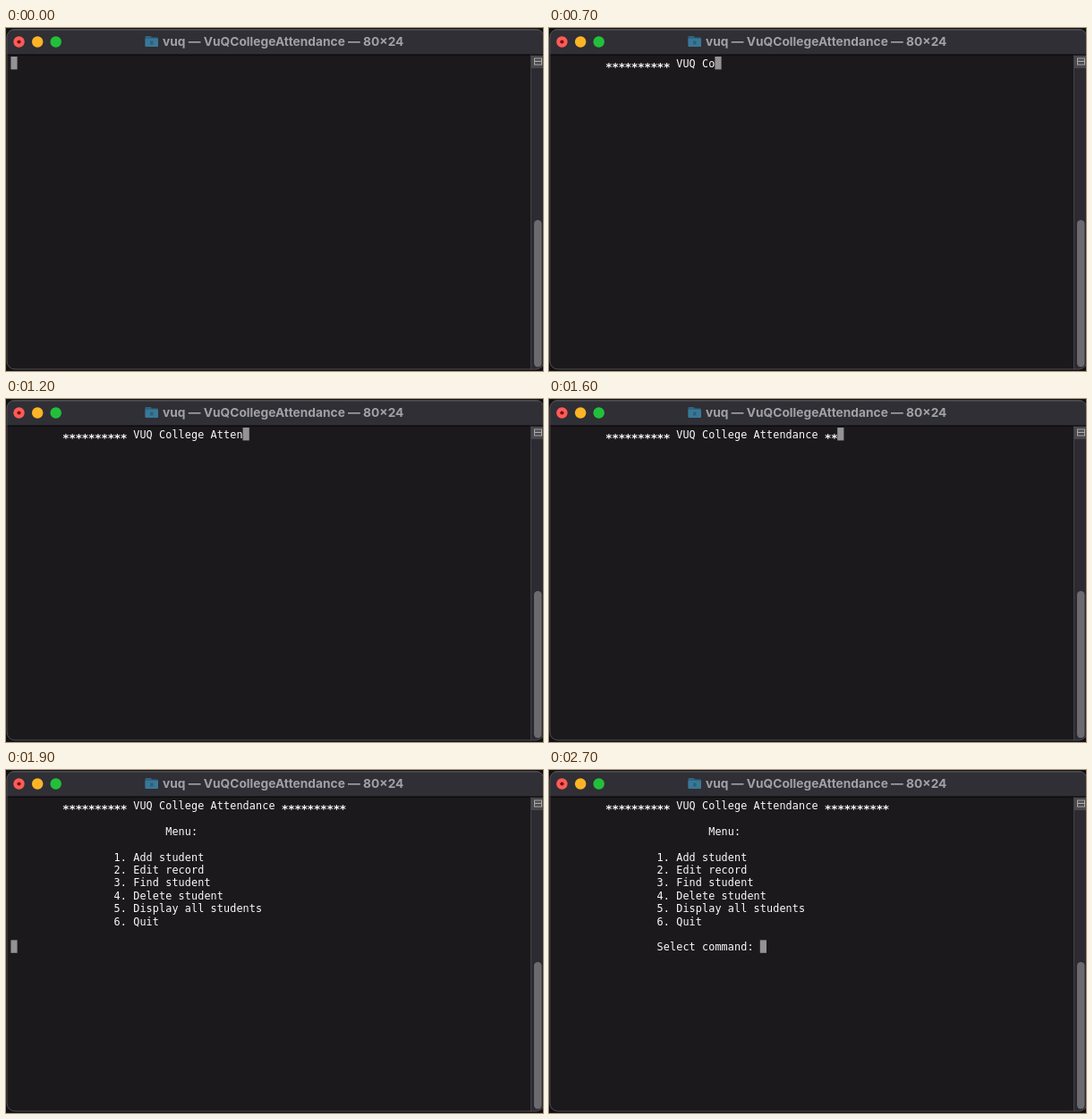
Recreate the animation shown at these times as an HTML page with a canvas. Size 600 by 384 pixels, loop 4000 ms.

```html
<!DOCTYPE html>
<html lang="en">
<head>
<meta charset="utf-8">
<title>Terminal menu</title>
<style>
  html, body { margin: 0; width: 100%; height: 100%; overflow: hidden; background: #121114; }
  canvas { display: block; }
</style>
</head>
<body>
<canvas id="stage" width="600" height="384"></canvas>
<script>
const ctx = document.getElementById('stage').getContext('2d');

const LOOP = 4000, STEP = 100;
const LEFT = 5.4, TOP = 32, COL = 7.2, ROW = 14.4;

const stars = '*'.repeat(10);
const heading = ' '.repeat(8) + `${stars} VUQ College Attendance ${stars}`;
const prompt = ' '.repeat(16) + 'Select command: ';
const menu = ['Add student', 'Edit record', 'Find student', 'Delete student',
  'Display all students', 'Quit'];

// Cursor column at each step while a line is being typed
const headingCols = [0, 12, 14, 17, 19, 21, 23, 25, 28, 30, 32, 34, 36, 38, 40, 42, 44, 47, 51];
const promptCols = [0, 17, 19, 19, 25, 28, 30, 30, 32];

function box(x, y, w, h, color, radius = 0) {
  ctx.fillStyle = color;
  ctx.beginPath();
  ctx.roundRect(x, y, w, h, radius);
  ctx.fill();
}

function dot(x, y, r, color) {
  box(x - r, y - r, 2 * r, 2 * r, color, r);
}

function write(text, row, col = 0) {
  ctx.fillStyle = '#fbfafb';
  [...text].forEach((ch, i) => {
    const star = ch === '*';
    ctx.font = `${star ? 'bold 13px' : '11.8px'} "DejaVu Sans Mono", monospace`;
    ctx.fillText(ch, LEFT + (col + i) * COL, TOP + 12 + row * ROW + (star ? 3.5 : 0));
  });
}

function cursor(row, col) {
  box(LEFT + col * COL, TOP + row * ROW, COL, 14.4, '#949295');
}

function drawTitleBar() {
  box(0, 1, 600, 29, '#2f2f35');
  box(0, 1.5, 600, 1, '#57565b');
  box(0, 29.5, 600, 1, '#050506');
  dot(14.5, 15.5, 6.2, '#fc5b57');
  dot(14.5, 15.5, 2.1, '#7a0d0c');
  dot(35.2, 15.5, 6.2, '#fdb426');
  dot(55.7, 15.5, 6.2, '#22c03a');

  box(155.5, 9, 7, 4, '#2d6482', 1);
  box(155.5, 10.5, 14.5, 10.5, '#2d6482', 1.2);
  box(155.5, 12, 14.5, 9, '#397896', 1.2);
  box(161, 14.5, 3.5, 4, '#2b617d');

  ctx.font = '700 13.75px Inter, sans-serif';
  ctx.fillStyle = '#a2a1a6';
  ctx.fillText('vuq — VuQCollegeAttendance — 80×24', 175, 20);
}

function drawScrollbar() {
  box(586, 30.5, 14, 352, '#2c2b32');
  box(586, 30.5, 1, 352, '#434247');
  box(587, 31, 13, 14, '#49484c');
  box(590, 33.5, 9, 8, '#aaa9ac');
  box(591, 34.5, 7, 2.2, '#49484c');
  box(591, 38, 7, 2.5, '#49484c');
  box(590, 215, 8.5, 164.5, '#6b6a6e', 4.2);
}

function drawWindow() {
  box(0, 0, 600, 384, '#121114');
  ctx.save();
  ctx.beginPath();
  ctx.roundRect(0.5, 1, 600.5, 381.5, 9);
  ctx.clip();
  box(0, 0, 600, 384, '#1b191c');
  drawTitleBar();
  drawScrollbar();
  ctx.restore();
  ctx.strokeStyle = '#4d4c50';
  ctx.lineWidth = 1;
  ctx.beginPath();
  ctx.roundRect(1, 1.5, 600, 380.5, 9);
  ctx.stroke();
}

function draw(now) {
  const step = Math.floor(now % LOOP / STEP);
  const typingHeading = step < headingCols.length;
  drawWindow();
  if (typingHeading) {
    write(heading.slice(0, headingCols[step]), 0);
    cursor(0, headingCols[step]);
  } else {
    const index = Math.min(step - headingCols.length, promptCols.length - 1);
    write(heading, 0);
    write('Menu:', 2, 24);
    menu.forEach((item, i) => write(`${i + 1}. ${item}`, 4 + i, 16));
    write(prompt.slice(0, promptCols[index]), 11);
    cursor(11, promptCols[index]);
  }
  requestAnimationFrame(draw);
}

requestAnimationFrame(draw);
</script>
</body>
</html>
```
